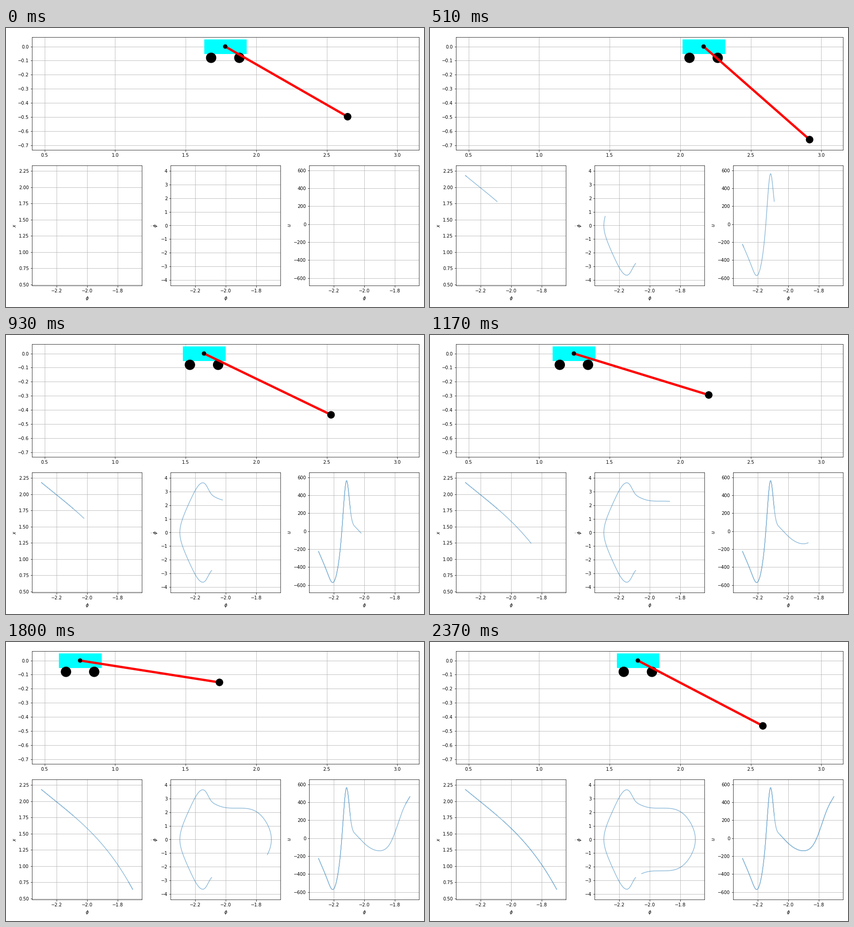
Animation, 917 px wide and 611 px high, one loop 2400 ms. Source, as a matplotlib script:

```python
import numpy as np
import matplotlib.pyplot as plt
from matplotlib.animation import FuncAnimation
from matplotlib.patches import Circle, Rectangle
from numpy.polynomial import Polynomial

W, H, DPI = 917, 611, 72
FRAMES, INTERVAL = 80, 30

# The pendulum swings about PHI0 by +-SWING; w = phi - PHI0
PHI0, SWING = -2.0, 0.3
MASS = 4.7
START, END = -1.2609, 4.8883

cart = Polynomial([1.5842, -2.285, -1.833, -3.17, -1.0])


def spline(points):
    """Natural cubic spline through (x, y) points."""
    x, y = np.array(points, float).T
    n, h = len(x), np.diff(x)
    slope = np.diff(y) / h
    a, b = np.eye(n), np.zeros(n)
    for i in range(1, n - 1):
        a[i, i - 1:i + 2] = h[i - 1], 2 * (h[i - 1] + h[i]), h[i]
        b[i] = 6 * (slope[i] - slope[i - 1])
    m = np.linalg.solve(a, b)

    def value(t):
        k = np.clip(np.searchsorted(x, t) - 1, 0, n - 2)
        l, r, d = x[k + 1] - t, t - x[k], h[k]
        return ((m[k] * l**3 + m[k + 1] * r**3) / (6 * d)
                + (y[k] / d - m[k] * d / 6) * l
                + (y[k + 1] / d - m[k + 1] * d / 6) * r)
    return value


# Angular acceleration along the swing
push = spline([(-0.3, 24.5), (-0.24, 53), (-0.206, 63), (-0.18, 48.5),
               (-0.1465, -8), (-0.116, -69), (-0.09, -32), (-0.06, -13),
               (0, -3.5), (0.1, 0), (0.17, -7), (0.25, -22), (0.3, -22.7)])


def running_sum(y, x):
    steps = (y[1:] + y[:-1]) / 2 * np.diff(x)
    return np.concatenate([[0], np.cumsum(steps)])


def offset(p):
    return -SWING * np.cos(p)


# Kinetic term v^2 / 2, made to vanish at both turning points
grid = offset(np.linspace(0, np.pi, 2001))
energy = running_sum(push(grid), grid)
energy -= energy[-1] * (grid + SWING) / (2 * SWING)


def kinetic(w):
    return np.maximum(np.interp(w, grid, energy), 0)


def speed(p):
    return np.sign(np.sin(p)) * np.sqrt(2 * kinetic(offset(p)))


def force(w):
    accel = cart.deriv()(w) * push(w) + 2 * cart.deriv(2)(w) * kinetic(w)
    return MASS * accel


def phase_per_frame():
    p = np.linspace(START, END, 6001)
    mid = (p[1:] + p[:-1]) / 2
    dt = SWING * np.sin(mid) / speed(mid)
    clock = np.concatenate([[0], np.cumsum(dt)])
    return np.interp(np.linspace(0, clock[-1], FRAMES), clock, p)


phases = phase_per_frame()

# The small excess keeps the canvas from being truncated by a pixel
fig = plt.figure(figsize=((W + 0.01) / DPI, (H + 0.01) / DPI), dpi=DPI,
                 facecolor="white")
LEFT, PITCH, WIDTH = 57.3, 304, 240.9


def panel(left, top, width, height, xlim, ylim, xticks, yticks):
    ax = fig.add_axes([left / W, 1 - (top + height) / H,
                       width / W, height / H])
    ax.set(xlim=xlim, ylim=ylim, xticks=xticks, yticks=yticks)
    ax.grid(True)
    return ax


def trace_panel(column, label, ylim, yticks):
    ax = panel(LEFT + column * PITCH, 301, WIDTH, 263, (-2.36, -1.64), ylim,
               [-2.2, -2.0, -1.8], yticks)
    ax.set_xlabel(r"$\phi$")
    ax.set_ylabel(label)
    return ax.plot([], [], color="tab:blue", alpha=0.5, lw=1.5)[0]


scene = panel(LEFT, 20, 2 * PITCH + WIDTH, 247,
              (0.4114, 3.1543), (-0.7329, 0.0666),
              np.linspace(0.5, 3, 6), np.linspace(-0.7, 0, 8))


def disc(radius, zorder):
    return scene.add_patch(Circle((0, 0), radius, color="black",
                                  zorder=zorder))


body = scene.add_patch(Rectangle((0, -0.05), 0.3, 0.1, color="cyan", zorder=2))
wheels = [disc(0.035, 3), disc(0.035, 3)]
rod, = scene.plot([], [], color="red", lw=5, zorder=4)
pivot, bob = disc(0.014, 5), disc(0.025, 5)

x_trace = trace_panel(0, "$x$", (0.486, 2.336), np.linspace(0.5, 2.25, 8))
v_trace = trace_panel(1, r"$\dot{\phi}$", (-4.39, 4.39), np.arange(-4, 5))
u_trace = trace_panel(2, "$u$", (-683.5, 655), np.arange(-600, 601, 200))


def update(i):
    w = offset(phases[i])
    x, phi = cart(w), PHI0 + w
    tip = x - np.sin(phi), np.cos(phi)
    body.set_x(x - 0.15)
    for wheel, side in zip(wheels, (-0.1, 0.1)):
        wheel.center = x + side, -0.08
    rod.set_data([x, tip[0]], [0, tip[1]])
    pivot.center = x, 0
    bob.center = tip

    p = np.linspace(START, phases[i], 12 * i)
    past = offset(p)
    x_trace.set_data(PHI0 + past, cart(past))
    v_trace.set_data(PHI0 + past, speed(p))
    u_trace.set_data(PHI0 + past, force(past))
    return body, *wheels, rod, pivot, bob, x_trace, v_trace, u_trace


anim = FuncAnimation(fig, update, frames=FRAMES, interval=INTERVAL,
                     repeat=True, repeat_delay=0, blit=False)
plt.show()
```
